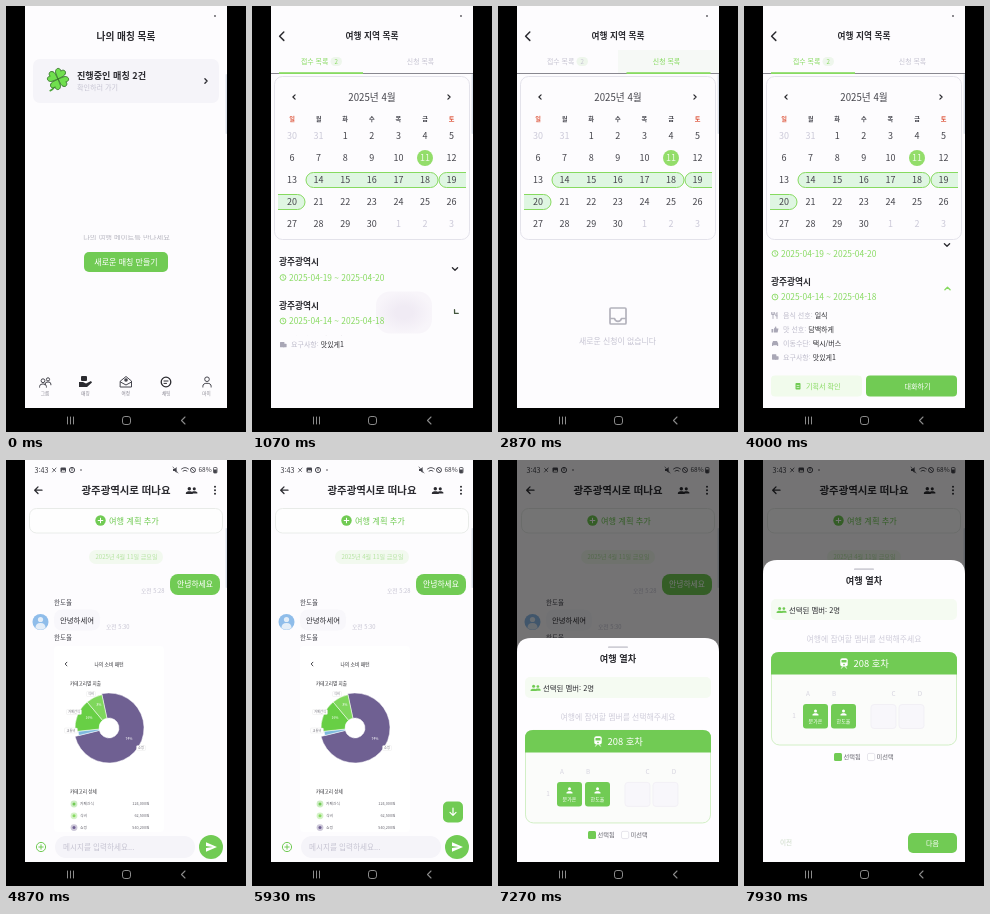
An HTML page that plays this animation: 240 by 426 pixels, repeating every 8 s.

```html
<!DOCTYPE html>
<html lang="ko">
<head>
<meta charset="utf-8">
<style>
html, body { margin: 0; width: 100%; height: 100%; overflow: hidden; background: #000; }
svg { display: block; width: 100%; height: 100%; }
text { font-family: "Noto Sans CJK KR", "Noto Sans CJK", "Noto Sans CJK JP", "Noto Sans", sans-serif; }
</style>
</head>
<body>
<svg id="stage" viewBox="0 0 240 426"></svg>
<script>
const INK = '#2b2b30', GREEN = '#71cb54', LIME = '#87da60', PALE = '#f1fbec', MIST = '#c6c4d2', BG = '#fdfcfe';
const RANGE = '#dff6e2', LOOP = 8000;

// Drawing helpers; text y is the visual middle of the line.
const text = (x, y, s, size, fill = INK, weight = 400, anchor = 'start') =>
  `<text x="${x}" y="${y + size * 0.37}" font-size="${size}" fill="${fill}" font-weight="${weight}" text-anchor="${anchor}">${s}</text>`;
const mid = (x, y, s, size, fill, weight) => text(x, y, s, size, fill, weight, 'middle');
const box = (x, y, w, h, r, fill, extra = '') =>
  `<rect x="${x}" y="${y}" width="${w}" height="${h}" rx="${r}" fill="${fill}" ${extra}/>`;
const dot = (x, y, r, fill, extra = '') => `<circle cx="${x}" cy="${y}" r="${r}" fill="${fill}" ${extra}/>`;
const line = (d, color = INK, w = 1.2) =>
  `<path d="${d}" fill="none" stroke="${color}" stroke-width="${w}" stroke-linecap="round" stroke-linejoin="round"/>`;
const fillPath = (d, color) => `<path d="${d}" fill="${color}"/>`;
const group = (id, body, extra = '') => `<g id="${id}" ${extra}>${body}</g>`;
const at = (x, y, body, more = '') => `<g transform="translate(${x} ${y}) ${more}">${body}</g>`;
const chevron = (x, y, dir, s = 2.2, w = 1.3, color = INK) =>
  line(`M${x - dir * s / 2} ${y - s}l${dir * s} ${s}l${-dir * s} ${s}`, color, w);
const down = color => line('M-2.6 -1.3L0 1.3L2.6 -1.3', color, 1.3);
const person = (x, y, s, color) => at(x, y,
  dot(0, -1.6, 1.5, color) + fillPath('M-3 3V2.2C-3 .2 3 .2 3 2.2V3Z', color), `scale(${s})`);
const people = (x, y, s, color) => person(x + 2.4 * s, y, s * 0.9, color) + person(x - 1.9 * s, y, s, color);
const plus = (x, y, r, color) => line(`M${x - r} ${y}h${2 * r}M${x} ${y - r}v${2 * r}`, color, 1);
const clock = (x, y) => dot(x, y, 2.9, 'none', `stroke="${LIME}" stroke-width=".9"`) + line(`M${x} ${y - 1.6}v1.7l1.1 .7`, LIME, 0.7);
const outline = (x, y, r, color) => dot(x, y - r * 1.2, r, 'none', `stroke="${color}"`) +
  line(`M${x - r * 1.8} ${y + r * 2.2}v-.8q0 -${r * 1.3} ${r * 1.8} -${r * 1.3}t${r * 1.8} ${r * 1.3}v.8`, color, 1);

function listPage() {
  const grey = '#45454d';
  const leaf = 'M0 0C-2 -3 -6 -5 -5 -8.5C-4.5 -11 -1 -11 0 -8.5C1 -11 4.5 -11 5 -8.5C6 -5 2 -3 0 0Z';
  const leaves = [0, 1, 2, 3].map(i =>
    `<path d="${leaf}" transform="rotate(${20 + i * 90})" fill="#70df4e" stroke="#38772c" stroke-width=".9"/>`).join('');
  const icons = [
    outline(37, 377, 1.9, grey) + outline(42, 375.3, 1.6, grey),
    box(75, 370, 6, 5, 1, INK) + fillPath('M73 376h4l3 1.5l5 -2.5l1 1.5l-5 4.5h-8Z', INK),
    line('M114.5 375l5.5 -4.5l5.5 4.5v6h-11ZM114.5 376l5.5 3l5.5 -3', grey, 1) + dot(120, 374, 1.8, grey),
    dot(160, 376, 4.8, 'none', 'stroke="#2b2b30" stroke-width="1.3"') + line('M158 375h4M158 377.4h2.5', INK, 1),
    outline(201, 376, 2.3, grey)
  ];
  const labels = ['그룹', '매칭', '여정', '채팅', '마이'];
  return box(19, 0, 202, 403, 0, BG) +
    mid(120, 30, '나의 매칭 목록', 9.7, INK, 700) +
    box(27, 53, 186, 44, 7, '#f5f4f9') +
    at(52, 73, line('M0 0Q-2 9 -8 12', '#4aa337', 1.6) + leaves, 'scale(.98)') +
    text(71, 70, '진행중인 매칭 2건', 9.1, INK, 700) +
    text(71, 81, '확인하러 가기', 7.1, MIST) + chevron(200, 75, 1) +
    group('hint', mid(120.5, 231, '나의 여행 메이트를 만나세요', 7.3, '#b9b8c2'), 'clip-path="url(#hintClip)"') +
    box(78, 246, 84, 20, 5, GREEN) + mid(120, 256, '새로운 매칭 만들기', 8, '#fff') +
    icons.join('') + labels.map((s, i) => mid(39 + i * 40.4, 387.5, s, 4.6, '#85838f')).join('');
}

function calendar() {
  const colX = c => 40 + c * 26.6, rowY = r => 130 + r * 22;
  const edge = `fill="${RANGE}" stroke="${LIME}" stroke-width="1"`;
  let s = box(22.5, 70.5, 195, 163, 8, BG, 'stroke="#dddce6" stroke-width=".8"') +
    chevron(42, 91, -1, 2.2, 1.2) + chevron(197, 91, 1, 2.2, 1.2) + mid(120, 91, '2025년 4월', 9.7, '#44444b', 500) +
    box(54, 166.5, 132, 15, 7.5, RANGE, `stroke="${LIME}" stroke-width="1"`) +
    `<path d="M214 166.5H194.5a7.5 7.5 0 0 0 0 15H214" ${edge}/><path d="M26 188.5H45.5a7.5 7.5 0 0 1 0 15H26" ${edge}/>` +
    dot(173, 152, 8, '#93dd6a');
  [...'일월화수목금토'].forEach((d, c) => s += mid(colX(c), 113, d, 6.2, c % 6 ? '#44444c' : '#dd5238', 700));
  for (let i = 0; i < 35; i++) {
    const n = i - 1, out = n < 1 || n > 30;
    const day = n < 1 ? n + 31 : n > 30 ? n - 30 : n;
    s += mid(colX(i % 7), rowY(Math.floor(i / 7)), day, 9, out ? '#cbc9d8' : n === 11 ? '#effbe8' : '#44444b');
  }
  return s;
}

function detail() {
  const rows = [['음식 선호:', '일식', 34], ['맛 선호:', '담백하게', 48], ['이동수단:', '택시/버스', 62], ['요구사항:', '맛있게1', 75.5]];
  const c = '#a9a7b6';
  const icons = [
    line('M29 -3v6M27.6 -3v2h2.8v-2M33 3v-6q-1.5 1 -1.3 3.4h1.3', c, 0.9),
    box(27.5, -0.5, 1.6, 3.5, 0, c) + fillPath('M29.8 -.5L32 -3.5L32.5 -1H34.5L33.6 3H29.8Z', c),
    fillPath('M28 2.5V0L29 -2.5H33L34.2 0V2.5H33V1.7H29.2V2.5Z', c),
    box(28, -2.7, 4.4, 5.4, 0.6, c) + box(31, -0.8, 3.6, 3.5, 0.6, c)
  ];
  return rows.map(([k, v, y], i) => at(0, y, icons[i] +
    `<text x="39" y="2.6" font-size="7" fill="#bebccb">${k} <tspan fill="${INK}" font-weight="500">${v}</tspan></text>`)).join('') +
    box(27, 94, 91, 21, 4, PALE) + box(51.5, 101.5, 5, 6.5, 0.7, GREEN) + line('M53 104h2M53 106h2', '#fff', 0.6) +
    text(62, 104.5, '기획서 확인', 7.05, LIME) +
    box(122, 94, 91, 21, 4, GREEN) + mid(173.5, 104.5, '대화하기', 7.1, '#fff');
}

function tripPage() {
  const item = (y, date) => text(27, y, '광주광역시', 8.7, INK, 700) + clock(31, y + 15.5) + text(37, y + 15.5, date, 8.4, LIME);
  const list = group('scroll',
    item(256, '2025-04-19 ~ 2025-04-20') + at(203, 263, down(INK)) +
    '<rect id="splash" rx="14" fill="url(#splashFill)"/>' + item(299.5, '2025-04-14 ~ 2025-04-18') +
    group('arrow', down('currentColor')) +
    `<g clip-path="url(#tileClip)">${group('tile', detail())}</g>`);
  const empty = line('M113 302h14q1 0 1 1v14q0 1 -1 1h-14q-1 0 -1 -1v-14q0 -1 1 -1ZM112 312.5h4.5q.8 2.8 3.5 2.8t3.5 -2.8h4.5', '#b3b2bc', 1.7) +
    mid(119.5, 335, '새로운 신청이 없습니다', 7.9, MIST);
  return box(19, 0, 202, 403, 0, BG) +
    line('M31.8 26l-4.2 4.2l4.2 4.2', INK, 1.5) + mid(120, 30, '여행 지역 목록', 8.7, INK, 700) +
    box(120, 44, 101, 23, 0, '#f6f9f6', 'id="press"') +
    group('tab1', text(49, 55.5, '접수 목록', 6.9, 'currentColor') + box(78.5, 51, 11.5, 9, 4.5, '#eef6ec') + mid(84.2, 55.5, '2', 6.2, 'currentColor')) +
    group('tab2', mid(168.5, 55.5, '신청 목록', 6.9, 'currentColor')) +
    box(19, 67, 202, 0.8, 0, '#6c6b74') + box(27, 66.2, 84, 1.8, 0, LIME, 'id="mark"') +
    `<g clip-path="url(#listClip)">${group('list', list)}${group('empty', empty)}</g>` + calendar();
}

function donut(x, y) {
  const pt = (a, r) => `${x + r * Math.sin(a * Math.PI / 180)} ${y - r * Math.cos(a * Math.PI / 180)}`;
  const slice = (a, b, r, color) => {
    const big = b - a > 180 ? 1 : 0;
    return `<path d="M${pt(a, r)}A${r} ${r} 0 ${big} 1 ${pt(b, r)}L${pt(b, 10)}A10 10 0 ${big} 0 ${pt(a, 10)}Z" fill="${color}" stroke="#fff" stroke-width=".5"/>`;
  };
  const tag = (tx, ty, s, w) => box(tx - w / 2, ty - 2.5, w, 5, 1, '#fff', 'stroke="#ddd" stroke-width=".3"') + mid(tx, ty, s, 3.2, '#77757f');
  return slice(-12, 256, 35, '#6f6092') + slice(256, 264, 31, '#7fb9de') + slice(264, 320, 34, '#68cf45') + slice(320, 348, 34, '#7fd75c') +
    mid(83, 258, '16%', 3.4, '#fff') + mid(93, 245, '8%', 3.4, '#fff') + mid(123, 279, '74%', 3.4, '#fff') +
    tag(85, 234, '식비', 9) + tag(68, 252, '카페간식', 15) + tag(65, 270.5, '교통비', 13) + tag(135, 288, '쇼핑', 9);
}

function chatPage() {
  const mate = '한도율';
  const costs = [['카페간식', '124,000원', GREEN], ['식비', '62,500원', LIME], ['쇼핑', '540,200원', '#6f6092']];
  const status = text(28.5, 10, '3:43', 7.2, '#3a3a40') + line('M46.5 12l3.5 -4M46.5 8.5l3 3', '#55555c', 0.9) +
    box(54.5, 7.5, 5.5, 5, 1, '#44444c') + fillPath('M55.3 11.7l1.5 -2l1 1l.7 -.7l1 1.7Z', '#fff') +
    dot(66, 10, 2.6, 'none', 'stroke="#44444c"') + line('M66 8v2.5', '#44444c', 0.9) + dot(75, 10, 0.8, '#44444c') +
    fillPath('M167 9h1.6l2 -2v6l-2 -2H167Z', '#44444c') + line('M167 7l5 6', '#44444c', 0.7) +
    line('M175.5 9q3.5 -3 7 0M177 11q2 -1.6 4 0', '#44444c', 0.9) +
    dot(187, 10, 2.5, 'none', 'stroke="#44444c" stroke-width=".9"') + line('M185.3 8.3l3.4 3.4', '#44444c', 0.8) +
    text(192.5, 10, '68%', 6.5, '#3a3a40') + box(207.5, 7.5, 3.5, 5.5, 0.8, 'none', 'stroke="#44444c" stroke-width=".8"') + box(207.8, 9.5, 3, 3.4, 0.3, '#44444c');
  return box(19, 0, 202, 403, 0, BG) + status +
    line('M36 30.2h-7M32 26.9l-3.3 3.3l3.3 3.3', INK, 1.3) + mid(120, 30.5, '광주광역시로 떠나요', 10.4, INK, 700) +
    people(185.5, 30.5, 1.15, INK) + [26.8, 30.3, 33.8].map(y => dot(209, y, 1, INK)).join('') +
    box(23.5, 48.5, 193, 24.5, 7, '#fefefe', 'stroke="#e4e8e4" stroke-width=".8"') +
    dot(94.5, 60.5, 5.2, GREEN) + plus(94.5, 60.5, 2.3, '#fff') + text(103, 60.5, '여행 계획 추가', 8.2, GREEN, 500) +
    box(83, 90, 74, 14, 7, '#f2f9ef') + mid(120.5, 97, '2025년 4월 11일 금요일', 6.05, '#b3e39f') +
    text(135, 131, '오전 5:28', 5.8, MIST) + box(164, 114, 50, 21, 8, GREEN) + mid(189, 124.5, '안녕하세요', 7.8, '#fff') +
    text(48, 143, mate, 6.5, '#44444c') +
    dot(34.5, 162, 8, '#8fbdea') + dot(34.5, 159.5, 2.6, '#e4eef8') + fillPath('M29.5 168q0 -5 5 -5t5 5q-5 3.5 -10 0Z', '#e4eef8') +
    box(48, 149.5, 46, 21, 8, '#f8f7fb') + text(54, 160, '안녕하세여', 7.4) + text(100, 167, '오전 5:30', 5.8, MIST) +
    text(48, 178, mate, 6.5, '#44444c') +
    box(48, 186, 110, 186, 4, '#fff') + chevron(60, 204, -1, 1.8, 0.9) + mid(103, 204, '나의 소비 패턴', 4.8, INK, 500) +
    text(64, 223, '카테고리별 지출', 4.6, INK, 500) + donut(103, 268) + text(64, 331, '카테고리 상세', 4.6, INK, 500) +
    costs.map(([k, v, c], i) => dot(68, 344 + i * 11.8, 3.4, c, 'opacity=".35"') + dot(68, 344 + i * 11.8, 1.5, c) +
      text(74, 344 + i * 11.8, k, 3.8, '#66656e') + text(143.5, 344 + i * 11.8, v, 3.8, '#66656e', 400, 'end')).join('') +
    group('fab', box(191, 341.5, 20, 21, 5, GREEN) + line('M201 348v7M198 352.3l3 3l3 -3', '#fff', 1.2)) +
    box(19, 372, 202, 31, 0, BG) + dot(35, 387, 4.6, 'none', `stroke="${GREEN}"`) + plus(35, 387, 2.2, GREEN) +
    box(49, 376, 140, 22, 11, '#f5f4f9') + text(57, 387, '메시지를 입력하세요...', 7.6, MIST) +
    dot(205, 387, 12, GREEN) + fillPath('M200 382.3L211 387L200 391.7V388L207 387L200 386Z', '#fff');
}

const dialog = () => box(38.5, 157, 162.5, 105, 14, '#fff') + text(51, 176, '여행 계획', 11.7, INK, 500) +
  text(51, 198, '여행 계획을 선택하거나 새로 만들 수 있습', 7.8, '#55545c') + text(51, 210, '니다.', 7.8, '#55545c') +
  text(75, 239, '기존 계획 선택', 6.7, LIME) + box(124.5, 229, 65.5, 20, 10, GREEN) + mid(157, 239, '새 계획 만들기', 7, '#fff', 500);

function sheet() {
  const seat = (x, name) => box(x, 244, 25, 24.5, 3, GREEN) + person(x + 12.5, 252.5, 1, '#fff') + mid(x + 12.5, 261, name, 5, '#fff');
  const free = x => box(x, 244.5, 25, 24, 3, '#f8f7fb', 'stroke="#efedf4" stroke-width=".7"');
  const letters = [64, 90, 149.5, 176];
  return '<path d="M19 403V114q0 -14 14 -14h174q14 0 14 14V403Z" fill="#fefdff"/>' +
    box(110, 108.3, 20, 1.8, 0.9, '#cfced6') + mid(120, 121, '여행 열차', 9.2, INK, 700) +
    box(27, 139, 186, 21, 5, '#f5fbf2') + people(37.5, 150, 1, GREEN) + text(45, 150, '선택된 멤버: 2명', 7.4, INK, 500) +
    mid(120, 179, '여행에 참여할 멤버를 선택해주세요', 7.85, '#cfcdda') +
    box(27.5, 192.5, 185, 92.5, 8, '#fbfcfa', 'stroke="#cdeec0" stroke-width=".9"') +
    `<path d="M27 214.5V200q0 -8 8 -8h170q8 0 8 8v14.5Z" fill="${GREEN}"/>` +
    box(96.3, 198.3, 7.4, 8.2, 2, '#fff') + box(97.5, 200, 5, 2.6, 0.4, GREEN) + dot(100, 204.6, 0.8, GREEN) + line('M97.6 208.2l1 -1.5M102.4 208.2l-1 -1.5', '#fff', 0.9) +
    text(109.5, 203.3, '208 호차', 9.4, '#fff', 500) +
    [...'ABCD'].map((c, i) => mid(letters[i], 233.5, c, 6.4, '#d6d4df')).join('') + mid(50, 256, '1', 6.4, '#d6d4df') +
    seat(59, '문가온') + seat(87, '한도율') + free(127) + free(155) +
    box(90, 293, 8, 8, 1.5, GREEN) + text(99.5, 297, '선택됨', 6.2, '#66656e') +
    box(123.5, 293.4, 7.2, 7.2, 1.5, '#fff', 'stroke="#dddbe4" stroke-width=".7"') + text(132.5, 297, '미선택', 6.2, '#66656e') +
    text(36, 383, '이전', 6.6, '#c9d8c3') + box(164, 373, 49, 20, 5, GREEN) + mid(188.5, 383, '다음', 7, '#fff', 500);
}

const stage = document.getElementById('stage');
const clip = (id, x, y, w, h) => `<clipPath id="${id}"><rect id="${id}Box" x="${x}" y="${y}" width="${w}" height="${h}"/></clipPath>`;
stage.innerHTML = '<defs>' + clip('screen', 19, 0, 202, 402) + clip('listClip', 19, 237, 202, 166) +
  clip('tileClip', 19, 329.5, 202, 0) + clip('hintClip', 70, 229, 100, 5) +
  '<radialGradient id="splashFill"><stop offset=".3" stop-color="#f0ebf4"/><stop offset="1" stop-color="#f8f5fa"/></radialGradient></defs>' +
  box(0, 0, 240, 426, 0, '#000') +
  '<g clip-path="url(#screen)">' + group('home', listPage()) + group('trip', tripPage()) +
  dot(209, 10, 0.9, '#55555c', 'id="notice"') + group('chat', chatPage()) +
  box(219.6, 68, 1.4, 60, 0.7, '#d9dfe8') +
  box(19, 0, 202, 403, 0, '#000', 'id="shade"') + group('dialog', dialog()) + group('sheet', sheet()) + '</g>' +
  line('M61.5 411v7M64.5 411v7M67.5 411v7', '#8b8b8b', 1) +
  box(116.5, 410.5, 8, 8, 2.4, 'none', 'stroke="#8b8b8b" stroke-width="1"') + line('M179 411l-3.5 3.5l3.5 3.5', '#8b8b8b', 1.1);

const el = {};
stage.querySelectorAll('[id]').forEach(n => el[n.id] = n);
const set = (id, attrs) => { for (const k in attrs) el[id].setAttribute(k, attrs[k]); };
const ramp = (t, a, b) => Math.min(1, Math.max(0, (t - a) / (b - a)));
const smooth = p => p * p * (3 - 2 * p);
const out = p => 1 - (1 - p) ** 3;
const mix = (a, b, p) => `rgb(${a.map((v, i) => Math.round(v + (b[i] - v) * p))})`;
const lime = [135, 218, 96], mist = [198, 196, 210], ink = [43, 43, 48];

// Zooming fade used when a page is pushed or a dialog opens.
function appear(id, p, cx, cy, from) {
  const s = from + (1 - from) * out(p);
  set(id, { opacity: p, display: p > 0 ? 'inline' : 'none', transform: `translate(${cx * (1 - s)} ${cy * (1 - s)}) scale(${s})` });
}

function draw(t) {
  const reveal = ramp(t, 50, 130);
  set('hintClipBox', { y: 229 - 4 * reveal, height: 5 + 8 * reveal });

  appear('trip', ramp(t, 380, 620), 120, 201, 0.92);
  // The tile opens around its own middle.
  const open = ramp(t, 982, 1182) ** 1.75;
  const h = 96 * open, scroll = 24 * out(ramp(t, 1500, 1900));
  set('scroll', { transform: `translate(0 ${-scroll})` });
  set('tileClipBox', { height: h });
  set('tile', { transform: `translate(0 ${299.5 + (h - 96) / 2})` });
  set('arrow', { transform: `translate(203.5 306.5) rotate(${180 * open})`, color: mix(ink, lime, open) });
  const grow = out(ramp(t, 930, 1070)), w = 56 * grow, sh = 42 * grow;
  set('splash', { x: 152 - w / 2, y: 306.5 - sh / 2, width: w, height: sh, opacity: 1 - ramp(t, 1100, 1260) });

  const tab = smooth(ramp(t, 2450, 2750)) - smooth(ramp(t, 3200, 3500));
  set('mark', { x: 27 + 101.5 * tab });
  set('list', { transform: `translate(${-202 * tab} 0)` });
  set('empty', { transform: `translate(${202 * (1 - tab)} 0)` });
  set('tab1', { color: mix(lime, mist, tab) });
  set('tab2', { color: mix(mist, lime, tab) });
  set('press', { opacity: ramp(t, 2400, 2480) * (1 - ramp(t, 2880, 3050)) });

  appear('chat', ramp(t, 4280, 4540), 120, 201, 0.92);
  set('fab', { opacity: ramp(t, 5500, 5650) });
  set('shade', { opacity: 0.54 * ramp(t, 6250, 6400) });
  appear('dialog', ramp(t, 6250, 6400) * (1 - ramp(t, 7080, 7180)), 120, 210, 0.94);
  set('sheet', { transform: `translate(0 ${303 * (1 - out(ramp(t, 7180, 7430)))})` });
}

const start = performance.now();
function tick() {
  draw((performance.now() - start) % LOOP);
  requestAnimationFrame(tick);
}
tick();
</script>
</body>
</html>
```
